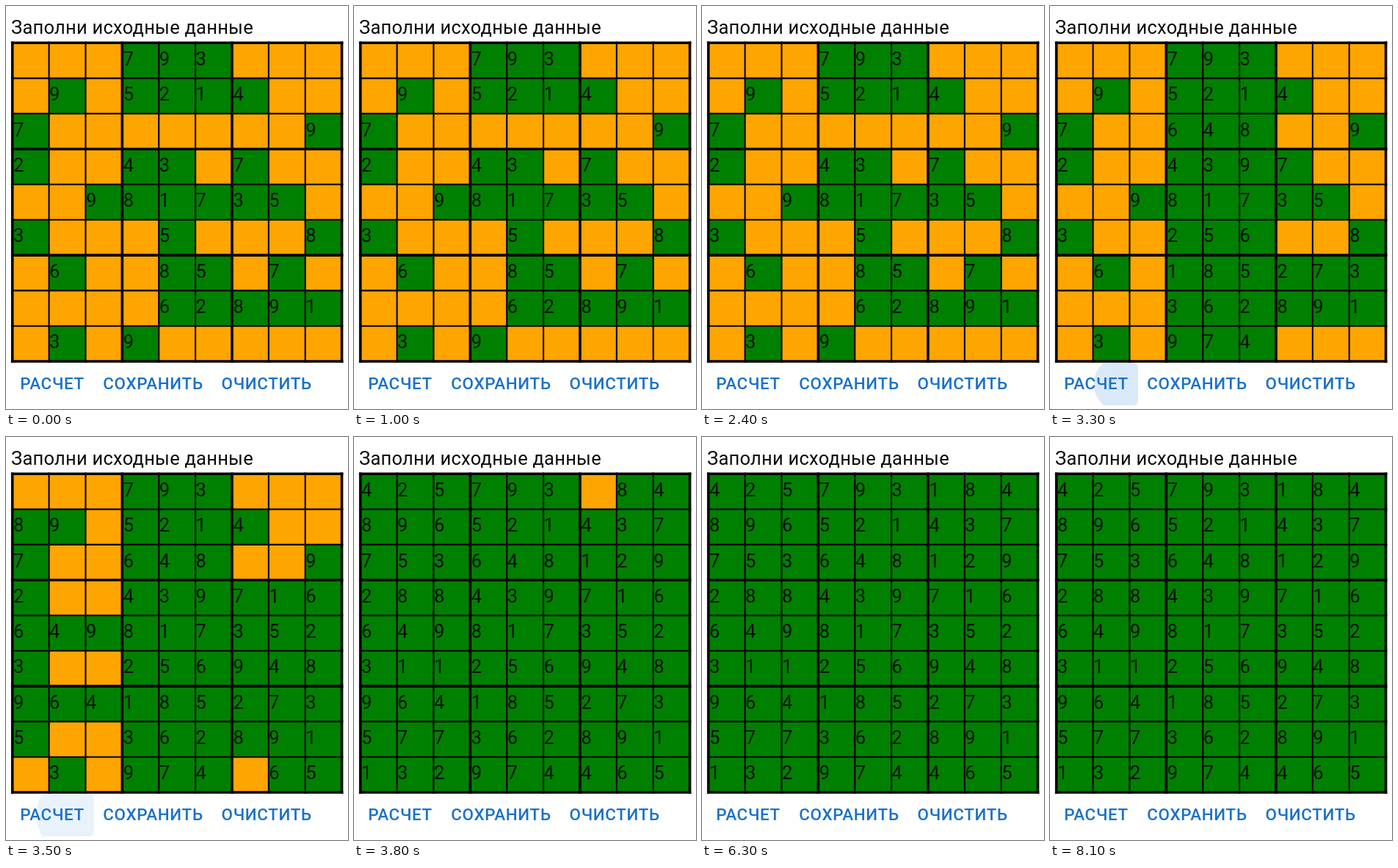
Write an HTML page that moves like this. It is 466x550 px and loops after 8300 ms.

```html
<!DOCTYPE html>
<html lang="ru">
<head>
<meta charset="utf-8">
<title>Судоку</title>
<style>
  html, body { margin: 0; width: 100%; height: 100%; overflow: hidden; background: #fff; }
  svg { display: block; width: 466px; height: 550px; font-family: Roboto, sans-serif; }
  .title, .digit { font-size: 25.5px; }
  .title { fill: #0c0c0c; letter-spacing: .00938em; }
  .digit { fill: rgba(0, 0, 0, .87); }
  .button { font-size: 22.4px; font-weight: 500; letter-spacing: .02857em; fill: #1a71cb; }
  #ripple { fill: #1976d2; }
  #lines { stroke: #000; }
</style>
</head>
<body>
<svg viewBox="0 0 466 550">
  <clipPath id="press"><rect x="7" y="487" width="113" height="58" rx="6"/></clipPath>
  <text class="title" x="7" y="38.2">Заполни исходные данные</text>
  <g id="cells"></g>
  <g id="lines"></g>
  <g clip-path="url(#press)"><circle id="ripple" cx="98" cy="516" r="0"/></g>
  <text class="button" x="19.3" y="523">РАСЧЕТ</text>
  <text class="button" x="132.3" y="523">СОХРАНИТЬ</text>
  <text class="button" x="293.6" y="523">ОЧИСТИТЬ</text>
</svg>
<script>
const LOOP = 8300, TICK = 100, FILL_START = 3200;
const X0 = 8.7, Y0 = 50.3, W = 49.88, H = 48.3;

const given = ['000793000', '090521400', '700000009', '200430700', '009817350',
               '300050008', '060085070', '000062891', '030900000'];
const solved = ['425793184', '896521437', '753648129', '288439716', '649817352',
                '311256948', '964185273', '577362891', '132974465'];

// Row and column of each cell the solver fills, in order
const order = ('35 34 36 64 84 74 95 96 46 66 79 77 71 73 81 98 99 21 49 48 67 68 59 51 52 ' +
               '91 93 97 82 83 62 63 42 43 32 33 37 38 23 28 29 11 12 13 18 19 17').split(' ');
const filledAt = [6, 12, 18, 25, 32, 39, 46, 47];
const presses = [1200, 3100];

const byId = id => document.getElementById(id);

function add(parent, tag, attrs) {
  const el = document.createElementNS('http://www.w3.org/2000/svg', tag);
  for (const key in attrs) el.setAttribute(key, attrs[key]);
  return parent.appendChild(el);
}

// A thick border on the left pushes the digit a little to the right
function makeCell(row, col) {
  const push = col % 3 ? 0 : .9;
  const box = add(byId('cells'), 'rect', { x: X0 + col * W, y: Y0 + row * H, width: W, height: H });
  const label = add(byId('cells'), 'text', { class: 'digit', x: 9.2 + col * W + push, y: 81.1 + row * 48.25 });
  return { box, label };
}

function setCell({ box, label }, digit) {
  box.setAttribute('fill', digit ? '#008000' : '#ffa500');
  label.textContent = digit;
}

const cells = given.map((line, row) => [...line].map((d, col) => {
  const cell = makeCell(row, col);
  setCell(cell, d === '0' ? '' : d);
  return cell;
}));

for (let i = 0; i <= 9; i++) {
  const x = X0 + i * W, y = Y0 + i * H;
  const width = i % 3 ? 2.1 : 3.6;
  add(byId('lines'), 'line', { x1: x, x2: x, y1: Y0 - 1.8, y2: Y0 + 9 * H + 1.8, 'stroke-width': width });
  add(byId('lines'), 'line', { x1: X0 - 1.8, x2: X0 + 9 * W + 1.8, y1: y, y2: y, 'stroke-width': width });
}

function drawRipple(t) {
  const age = Math.max(0, ...presses.map(p => t - p).filter(a => a < 700));
  const grow = Math.min(1, age / 550);
  byId('ripple').setAttribute('r', age ? 5 + 56 * grow * (2 - grow) : 0);
  byId('ripple').setAttribute('opacity', age ? .16 * Math.min(1, (700 - age) / 500) : 0);
}

let shown = 0;
function draw() {
  const t = Math.floor(performance.now() % LOOP / TICK) * TICK;
  const step = Math.min(7, (t - FILL_START) / TICK);
  const count = step < 0 ? 0 : filledAt[step];
  if (count !== shown) {
    order.forEach(([r, c], i) => setCell(cells[r - 1][c - 1], i < count ? solved[r - 1][c - 1] : ''));
    shown = count;
  }
  drawRipple(t);
  requestAnimationFrame(draw);
}
draw();
</script>
</body>
</html>
```
